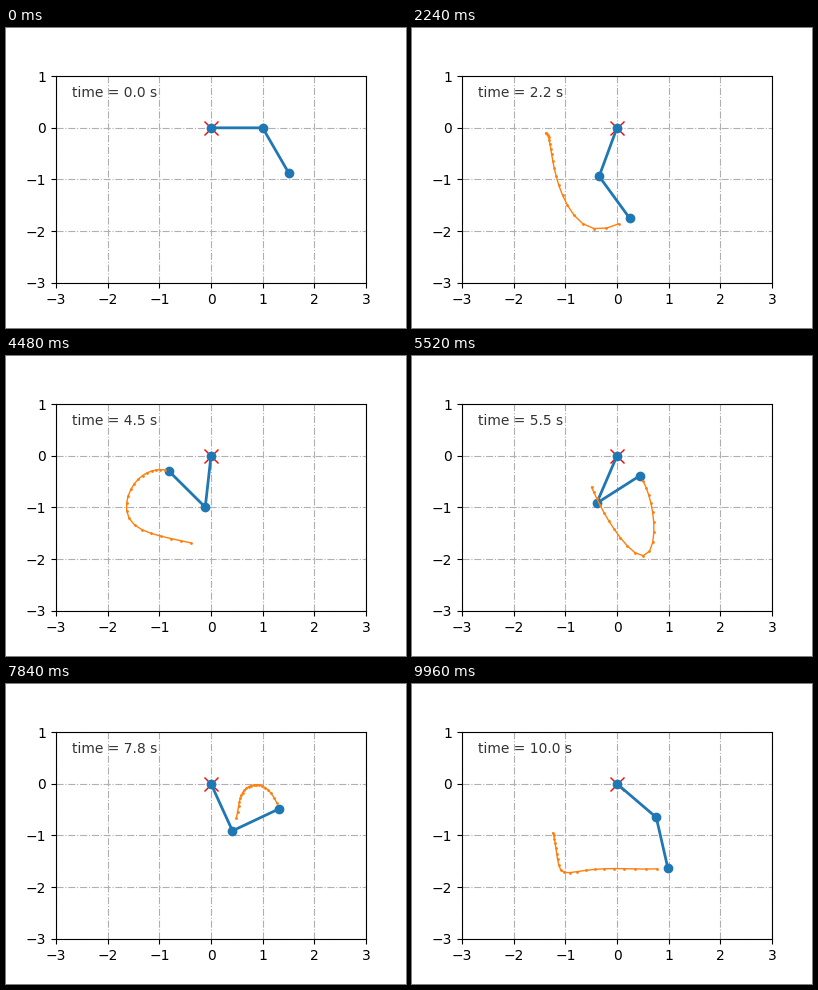
A matplotlib script that plays this animation: 400 px wide and 300 px high, repeating every 10000 ms.

```python
import numpy as np
import matplotlib.pyplot as plt
from matplotlib.animation import FuncAnimation

FRAMES, DT, TAIL = 250, 0.04, 20
G = 9.8
RTOL, ATOL = 1e-3, 1e-6


def deriv(state):
    """Double pendulum, unit rods and masses; two angles, then two speeds."""
    a, b, u, v = state
    c, s = np.cos(a - b), np.sin(a - b)
    p = -v * v * s - 2 * G * np.sin(a)
    q = u * u * s - G * np.sin(b)
    du = (p - c * q) / (2 - c * c)
    return np.array([u, v, du, q - c * du])


def rms(v):
    return np.sqrt(np.mean(v * v))


def first_step(y, f):
    scale = ATOL + RTOL * np.abs(y)
    slope = rms(f / scale)
    h = 0.01 * rms(y / scale) / slope
    bend = rms((deriv(y + h * f) - f) / scale) / h
    return min(100 * h, (0.01 / max(slope, bend)) ** 0.2)


def try_step(y, k1, h):
    """One Dormand-Prince step: end state, end slope, error, bulge."""
    k2 = deriv(y + h * k1 / 5)
    k3 = deriv(y + h * (3/40 * k1 + 9/40 * k2))
    k4 = deriv(y + h * (44/45 * k1 - 56/15 * k2 + 32/9 * k3))
    k5 = deriv(y + h * (19372/6561 * k1 - 25360/2187 * k2
                        + 64448/6561 * k3 - 212/729 * k4))
    k6 = deriv(y + h * (9017/3168 * k1 - 355/33 * k2 + 46732/5247 * k3
                        + 49/176 * k4 - 5103/18656 * k5))
    end = y + h * (35/384 * k1 + 500/1113 * k3 + 125/192 * k4
                   - 2187/6784 * k5 + 11/84 * k6)
    k7 = deriv(end)
    error = h * (-71/57600 * k1 + 71/16695 * k3 - 71/1920 * k4
                 + 17253/339200 * k5 - 22/525 * k6 + k7 / 40)
    bulge = h * (-12715105075/11282082432 * k1
                 + 87487479700/32700410799 * k3
                 - 10690763975/1880347072 * k4
                 + 701980252875/199316789632 * k5
                 - 1453857185/822651844 * k6
                 + 69997945/29380423 * k7)
    return end, k7, error, bulge


def simulate(y):
    """Adaptive integration, interpolated at every frame time."""
    t, f = 0.0, deriv(y)
    h = first_step(y, f)
    path, growth = [y], 10
    while len(path) < FRAMES:
        end, slope, error, bulge = try_step(y, f, h)
        miss = rms(error / (ATOL + RTOL * np.maximum(np.abs(y), np.abs(end))))
        factor = 0.9 * max(miss, 1e-12) ** -0.2
        if miss >= 1:
            h *= max(0.2, factor)
            growth = 1
            continue
        while len(path) < FRAMES and len(path) * DT <= t + h:
            x = (len(path) * DT - t) / h
            w = 1 - x
            path.append(y + (end - y) * x * x * (3 - 2 * x)
                        + h * x * w * (w * f - x * slope)
                        + x * x * w * w * bulge)
        t, y, f = t + h, end, slope
        h *= min(growth, factor)
        growth = 10
    return np.array(path)


th1, th2 = simulate(np.array([np.pi / 2, np.pi / 6, 0, 0])).T[:2]
x1, y1 = np.sin(th1), -np.cos(th1)
x2, y2 = x1 + np.sin(th2), y1 - np.cos(th2)

fig = plt.figure(figsize=(4, 3), dpi=100)
ax = fig.add_subplot(xlim=(-3, 3), ylim=(-3, 1), aspect="equal")
ax.grid(linestyle="-.")
ax.plot(0, 0, "rx", ms=10)
rods, = ax.plot([], [], "o-", color="C0", lw=2)
trail, = ax.plot([], [], ".-", color="C1", lw=1, ms=2)
clock = ax.text(0.05, 0.9, "", color="0.2", transform=ax.transAxes)


def draw(i):
    rods.set_data([0, x1[i], x2[i]], [0, y1[i], y2[i]])
    past = slice(max(0, i - TAIL), i)
    trail.set_data(x2[past], y2[past])
    clock.set_text(f"time = {i * DT:.1f} s")
    return rods, trail, clock


anim = FuncAnimation(fig, draw, frames=FRAMES, init_func=lambda: draw(0),
                     interval=1000 * DT, repeat=True, repeat_delay=0)
plt.show()
```
